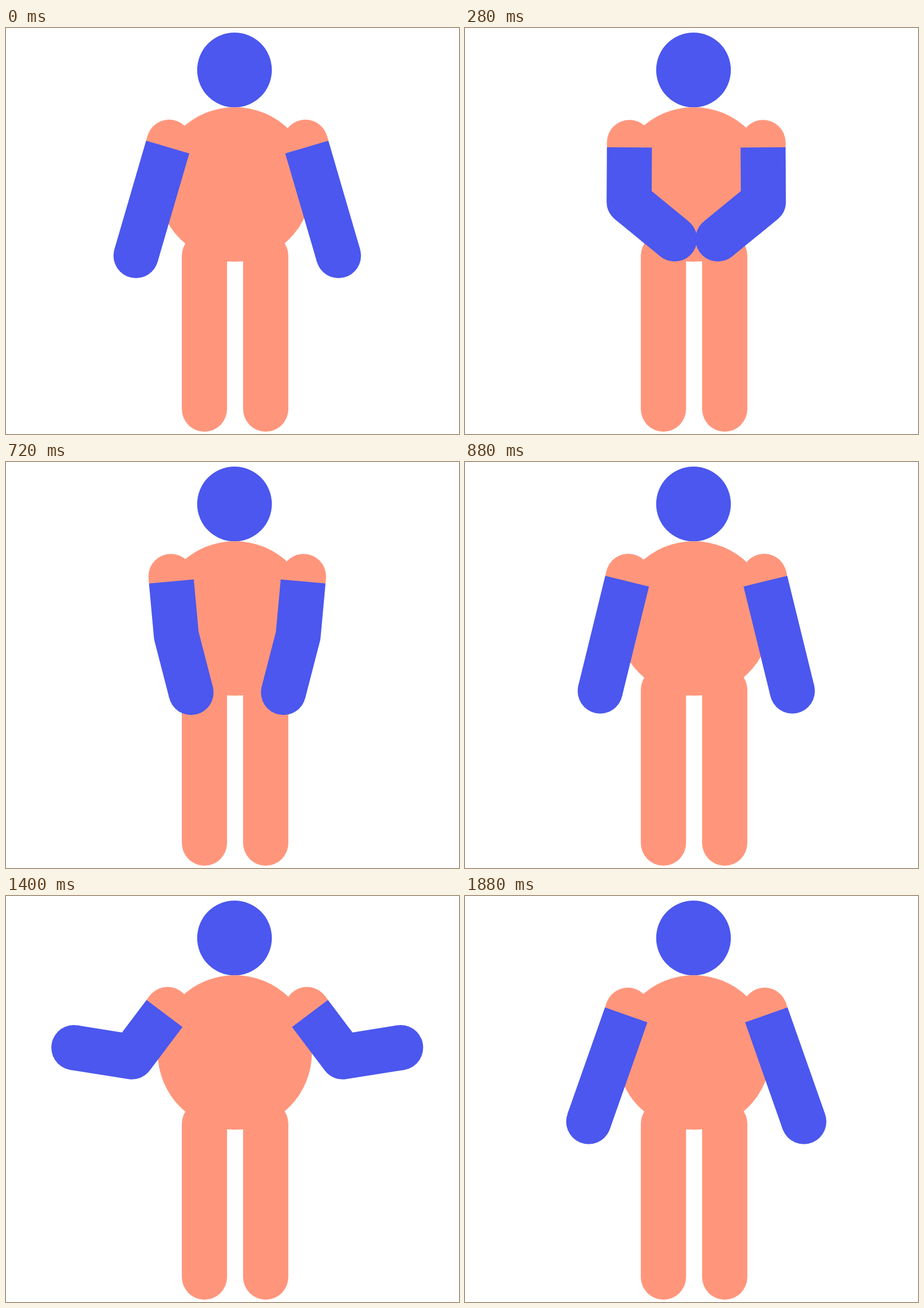
An HTML page for the animation above (1.92 s loop, 791 by 708 pixels).

```html
<!DOCTYPE html>
<html lang="en">
<head>
<meta charset="utf-8">
<title>Swinging arms</title>
<style>
  html, body { margin: 0; width: 100%; height: 100%; overflow: hidden; background: #fff; }
  svg { display: block; width: 791px; height: 708px; }
  .skin { fill: #ff967c; }
  .blue { fill: #4b57ee; }
  .sleeve { fill: none; stroke: #4b57ee; stroke-width: 78.6; stroke-linejoin: round; }
  .upper { fill: none; stroke: #ff967c; stroke-width: 78.6; }
</style>
</head>
<body>
<svg viewBox="0 0 791 708">
  <circle class="blue" cx="399" cy="73.2" r="65.2"/>
  <circle class="skin" cx="399.5" cy="272.8" r="134.7"/>
  <rect class="skin" x="307" y="357.5" width="79" height="346.5" rx="39.5"/>
  <rect class="skin" x="414" y="357.5" width="79" height="346.5" rx="39.5"/>
  <g class="arm"></g>
  <g class="arm" transform="translate(807.6 0) scale(-1 1)"></g>
</svg>
<script>
const LOOP = 1920, TICK = 40;
const SHOULDER = { x: 287.2, y: 191 };
const UPPER = 112, FORE = 102.6, RADIUS = 39.3;
const CAP = 8.5, CUFF = 17.3;

// time, direction of the hand from straight down (degrees, outward), reach
const KEYS = [
  [0, 16.3, 235],
  [280, -24, 193.7],
  [342, -31.4, 160],
  [451, -38.3, 135],
  [560, -31.4, 160],
  [622, -24, 193.7],
  [880, 13.8, 232],
  [1120, 45.4, 208],
  [1160, 50.6, 202.6],
  [1400, 66.5, 184],
  [1640, 50.7, 203.3],
  [1680, 45.4, 208],
  [1880, 19.4, 233]
];

const arms = [...document.querySelectorAll('.arm')].map(g => {
  g.innerHTML = '<circle class="skin"/><path class="upper"/><path class="sleeve"/><circle class="blue"/>';
  const [cap, upper, sleeve, hand] = g.children;
  cap.setAttribute('r', RADIUS);
  hand.setAttribute('r', RADIUS);
  return { cap, upper, sleeve, hand };
});

function key(i) {
  const n = KEYS.length, lap = Math.floor(i / n);
  const [t, ...rest] = KEYS[i - lap * n];
  return [t + lap * LOOP, ...rest];
}

// Smooth curve through the keys, wrapping around the loop
function sample(t, col) {
  const i = KEYS.findLastIndex(k => k[0] <= t);
  const [a, b, c, d] = [-1, 0, 1, 2].map(o => key(i + o));
  const span = c[0] - b[0], u = (t - b[0]) / span;
  const m0 = (c[col] - a[col]) / (c[0] - a[0]) * span;
  const m1 = (d[col] - b[col]) / (d[0] - b[0]) * span;
  const u2 = u * u, u3 = u2 * u;
  return (2 * u3 - 3 * u2 + 1) * b[col] + (u3 - 2 * u2 + u) * m0
       + (3 * u2 - 2 * u3) * c[col] + (u3 - u2) * m1;
}

const along = (p, angle, len) => ({
  x: p.x - Math.sin(angle) * len,
  y: p.y + Math.cos(angle) * len
});
const line = (...pts) => 'M' + pts.map(p => p.x.toFixed(2) + ' ' + p.y.toFixed(2)).join('L');

function place(circle, p) {
  circle.setAttribute('cx', p.x.toFixed(2));
  circle.setAttribute('cy', p.y.toFixed(2));
}

function pose(t) {
  const aim = sample(t, 1) * Math.PI / 180;
  const reach = Math.min(sample(t, 2), UPPER + FORE);
  const cos = (UPPER ** 2 + reach ** 2 - FORE ** 2) / (2 * UPPER * reach);
  const bend = Math.acos(Math.min(1, cos));
  const angle = aim - (aim > 0.15 ? bend : -bend);

  const cap = along(SHOULDER, angle, CAP);
  const cuff = along(SHOULDER, angle, CUFF);
  const elbow = along(SHOULDER, angle, UPPER);
  const hand = along(SHOULDER, aim, reach);
  for (const arm of arms) {
    place(arm.cap, cap);
    arm.upper.setAttribute('d', line(cap, cuff));
    arm.sleeve.setAttribute('d', line(cuff, elbow, hand));
    place(arm.hand, hand);
  }
}

const start = performance.now();
function frame() {
  const t = (performance.now() - start) % LOOP;
  pose(Math.floor(t / TICK) * TICK);
  requestAnimationFrame(frame);
}
frame();
</script>
</body>
</html>
```
